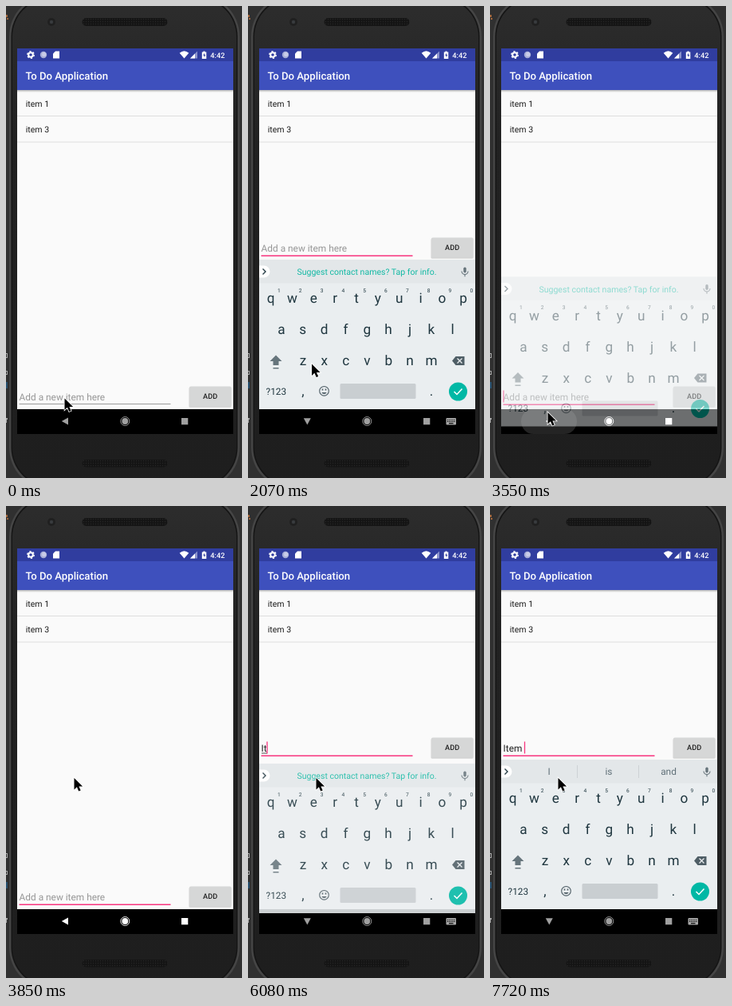
An HTML page for the animation above (8 s loop, 296x590 px).

```html
<!DOCTYPE html>
<html lang="en">
<head>
<meta charset="utf-8">
<title>To do app</title>
<style>
  html, body { margin: 0; width: 100%; height: 100%; overflow: hidden; background: #303030; }
  svg { display: block; width: 296px; height: 590px; }
  text { font-family: Roboto, sans-serif; text-rendering: geometricPrecision; white-space: pre; }
  .mid { text-anchor: middle; }
  .med { font-weight: 500; }
</style>
</head>
<body>
<svg viewBox="0 0 296 590" xmlns="http://www.w3.org/2000/svg">
  <defs>
    <linearGradient id="body" x1="0" y1="0" x2="0" y2="1">
      <stop offset="0" stop-color="#2d2d2d"/>
      <stop offset=".3" stop-color="#212121"/>
      <stop offset="1" stop-color="#1e1e1e"/>
    </linearGradient>
    <linearGradient id="shade" x1="0" y1="0" x2="0" y2="1">
      <stop offset="0" stop-color="#000" stop-opacity=".28"/>
      <stop offset="1" stop-color="#000" stop-opacity="0"/>
    </linearGradient>
    <pattern id="mesh" width="3" height="3" patternUnits="userSpaceOnUse">
      <rect width="3" height="3" fill="#141414"/>
      <circle cx="1.5" cy="1.5" r=".7" fill="#262626"/>
    </pattern>
    <clipPath id="screen"><rect x="14" y="53" width="271" height="482"/></clipPath>
  </defs>

  <!-- desktop and phone -->
  <rect width="296" height="590" fill="#303030"/>
  <path d="M0 11h2v3H0zM1 15h2v2H1z" fill="#a5673c"/>
  <path d="M0 434h2v1H0zM1 435h1v5H0v-1h1zM0 456h2v1H0zM1 457h1v4H0v-1h1zM0 515h2v2H1v4H0z" fill="#a9a9a9"/>
  <path d="M0 470h2v8H0z" fill="#28506f"/>
  <rect x="4" y="-14" width="289" height="618" rx="52" fill="#454545"/>
  <rect x="6.5" y="-11" width="284" height="612" rx="49" fill="#151515"/>
  <rect x="8" y="-9.5" width="281" height="609" rx="48" fill="url(#body)"/>
  <rect x="95.5" y="15" width="107" height="10" rx="5" fill="url(#mesh)"/>
  <rect x="95.5" y="567" width="107" height="9.5" rx="4.7" fill="url(#mesh)"/>
  <circle cx="57" cy="20" r="5" fill="#202020"/>
  <circle cx="57" cy="20" r="2.2" fill="#383b3e"/>

  <g clip-path="url(#screen)">
    <rect x="14" y="53" width="271" height="482" fill="#fafafa"/>
    <rect x="14" y="105" width="271" height="3" fill="url(#shade)"/>
    <rect x="14" y="53" width="271" height="16" fill="#303d9f"/>
    <rect x="14" y="69" width="271" height="36" fill="#3e50bd"/>

    <!-- status icons -->
    <circle cx="31" cy="61" r="2.8" fill="none" stroke="#fff" stroke-width="2"/>
    <circle cx="31" cy="61" r="4.2" fill="none" stroke="#fff" stroke-width="1.5" stroke-dasharray="2.2 2.198"/>
    <circle cx="47" cy="61" r="4.2" fill="#a9b0d8"/>
    <circle cx="47.6" cy="60.4" r="2.6" fill="#c9cde8"/>
    <path d="M62 56.5h5v9h-8v-6z" fill="#fff"/>
    <path d="M217.700 58.700q5.800-5 11.600 0l-5.800 6.900z" fill="#fff"/>
    <path d="M240 56.500v9h-9z" fill="#8b93cc"/>
    <path d="M237 59.500v6h-6z" fill="#fff"/>
    <path d="M247.500 56.500h2v1h1.800v8.500h-5.500v-8.500h1.700z" fill="#fff"/>
    <path d="M249 58.500l-1.700 3.500h1.200v2.500l1.700-3.500h-1.200z" fill="#303d9f"/>
    <text class="med" x="256.300" y="64.700" font-size="9.230" fill="#fff">4:42</text>

    <text class="med" x="24.500" y="92" font-size="13.200" fill="#fff">To Do Application</text>
    <g font-size="10.550" fill="#1c1c1c">
      <text x="24.700" y="125.600">item 1</text>
      <text x="24.700" y="158.100">item 3</text>
    </g>
    <path d="M14 137.500h271M14 170h271" stroke="#dedede"/>

    <!-- entry row -->
    <g id="row">
      <text id="entry" x="16.600" y="493" font-size="11.870"></text>
      <path id="compose" stroke="#212121" stroke-width=".8"/>
      <path id="line"/>
      <path id="caret" stroke="#f8357f" stroke-width="1.300"/>
      <rect x="229.500" y="476.500" width="53" height="25.300" rx="1.500" fill="#000" opacity=".16"/>
      <rect x="230" y="475.500" width="52.500" height="25" rx="1.500" fill="#d6d7d7"/>
      <text class="mid med" x="256.200" y="491.300" font-size="9.230" fill="#212121">ADD</text>
    </g>

    <rect x="14" y="504" width="271" height="31" fill="#000"/>

    <!-- soft keyboard -->
    <g id="board">
      <rect x="14" y="317" width="271" height="187" fill="#eaeef0"/>
      <rect x="14" y="317" width="271" height="29.500" fill="#e3e7e9"/>
      <path d="M14 324.500h6a7.500 7.500 0 0 1 0 15h-6z" fill="#fff"/>
      <path d="M18.500 328.500l3.500 3.500-3.500 3.500" fill="none" stroke="#263c45" stroke-width="1.400"/>
      <text id="tip" class="mid" x="149" y="336" font-size="10.550" fill="#12b9a4">Suggest contact names? Tap for info.</text>
      <g id="words" class="mid" font-size="11.870" fill="#607078">
        <path d="M109.500 324v16M186.500 324v16" stroke="#cdd2d5"/>
        <text x="74" y="336.300"></text><text x="149" y="336.300"></text><text x="224" y="336.300"></text>
      </g>
      <g stroke="#66747b" fill="none" stroke-width="1.100">
        <rect x="270.300" y="326.500" width="3.400" height="7" rx="1.700" fill="#66747b" stroke="none"/>
        <path d="M268 331.500a4 4 0 0 0 8 0M272 335.500v2.700"/>
      </g>
      <g id="keys" class="mid" fill="#1f363f"></g>
      <path d="M35 436.500l7.500 7.500h-4v5h-7v-5h-4zM31.500 452h7v1.600h-7z" fill="#66757c"/>
      <path d="M260.500 438h11v11h-11l-4.500-5.500z" fill="#4f5e66"/>
      <path d="M262.500 440.500l6 6m0-6l-6 6" stroke="#eaeef0" stroke-width="1.300"/>
      <g fill="none" stroke="#4f5e66" stroke-width="1.100">
        <circle cx="95.500" cy="481.300" r="5.800"/>
        <path d="M92.300 483a3.400 3 0 0 0 6.400 0z" fill="#4f5e66" stroke="none"/>
        <path d="M93.500 478.500v2M97.500 478.500v2" stroke-width="1.600"/>
      </g>
      <rect x="115.500" y="472" width="95" height="19" rx="1.500" fill="#c9ced1"/>
      <circle cx="263.500" cy="482" r="11.500" fill="#00b8a5"/>
      <path d="M258.500 482l3.500 3.500 6.500-7" fill="none" stroke="#fff" stroke-width="1.500"/>
    </g>

    <!-- navigation bar -->
    <rect id="ripple" y="503.500" height="31.500" rx="15.700" fill="#b4b4b4"/>
    <g id="nav">
      <path id="back"/>
      <circle cx="149.300" cy="519" r="3.900"/>
      <circle cx="149.300" cy="519" r="5.500" fill="none" id="ring"/>
      <rect x="220" y="515" width="8.300" height="8.300"/>
    </g>
    <g id="switch">
      <rect x="248.500" y="515" width="12.500" height="8.500" rx="1" fill="#a8a8a8"/>
      <path d="M250 517.200h9.500M250 519.400h9.500" stroke="#000" stroke-width="1.100" stroke-dasharray="1.100 1"/>
      <path d="M252 521.700h5.500" stroke="#000" stroke-width="1.100"/>
    </g>
  </g>

  <path id="mouse" d="M0 0v14.500l3.400-3.200 2.300 5.200 2.500-1.100-2.300-5h4.700z" fill="#000" stroke="#fff" stroke-width="1.600" paint-order="stroke"/>
</svg>

<script>
const LOOP = 8000, GAP = 40;
const $ = id => document.getElementById(id);
const set = (node, attrs) => {
  for (const k in attrs) node.setAttribute(k, attrs[k]);
};
const show = (node, on) => set(node, { display: on ? 'inline' : 'none' });

// key caps
const caps = [];
const cap = (s, x, y, size) =>
  caps.push(`<text x="${x.toFixed(1)}" y="${y}" font-size="${size}">${s}</text>`);
[['qwertyuiop', 28.7, 371], ['asdfghjkl', 42, 410], ['zxcvbnm', 69, 449]].forEach(([row, x, y], r) => {
  [...row].forEach((ch, i) => {
    cap(ch, x + i * 26.83, y, 17.2);
    if (!r) cap((i + 1) % 10, x + 10.1 + i * 26.83, 357.6, 6.6);
  });
});
cap('?123', 35.3, 485.7, 11.8);
cap(',', 69, 486.5, 17);
cap('.', 230, 486.5, 17);
$('keys').innerHTML = caps.join('');

/* m: pointer, focus, caret, up: entry row raised, drop: keyboard offset
   (GAP = hidden), ime: keyboard navigation, lit: bright icons, ripple: press
   strength, text: entry with cx as caret place, words: suggestions */
const start = {
  m: [73.5, 490.5], focus: 0, caret: 0, up: 0, drop: GAP, ime: 0,
  lit: 0, ripple: 0, text: '', cx: 17, words: null
};
const guesses = ['items', 'Item', 'Itemized'];
const steps = [
  [140, { m: [72.5, 489.5] }],
  [880, { m: [74, 487] }],
  [1030, { m: [75, 485.5], focus: 1, caret: 1 }],
  [1170, { ime: 1 }],
  [1470, { up: 1, drop: 21 }],
  [1620, { drop: 5 }],
  [1770, { drop: 0, m: [77, 474] }],
  [2070, { m: [80, 447.5], caret: 0 }],
  [2220, { m: [88, 462] }],
  [2370, { m: [104, 503] }],
  [2510, { m: [118, 538], caret: 1 }],
  [2660, { m: [121, 545] }],
  [2800, { m: [105, 541] }],
  [2950, { m: [86, 531] }],
  [3100, { m: [75, 524], caret: 0 }],
  [3250, { m: [73, 514], ripple: .5 }],
  [3400, { m: [72.5, 508], ripple: .8, caret: 1, up: 0, drop: 6, ime: 0, lit: 1 }],
  [3550, { drop: 21.5, ripple: 1 }],
  [3700, { m: [79, 420], drop: GAP, ripple: .4 }],
  [3850, { m: [85.5, 340], ripple: 0, caret: 0 }],
  [4300, { caret: 1 }],
  [4750, { caret: 0 }],
  [5350, { caret: 1 }],
  [5640, { text: 'I', cx: 20 }],
  [5790, { ime: 1, lit: 0 }],
  [5930, { text: 'It', cx: 24, up: 1, drop: 22.5 }],
  [6080, { drop: 5 }],
  [6230, { text: 'Ite', cx: 30.2, drop: 0, words: guesses }],
  [6380, { text: 'Item', cx: 40.5 }],
  [6830, { caret: 0 }],
  [7430, { caret: 1 }],
  [7720, { text: 'Item ', cx: 43.5, words: ['I', 'is', 'and'] }]
];

const wordNodes = [...$('words').querySelectorAll('text')];

function draw(t) {
  const s = { ...start };
  for (const [at, change] of steps) if (at <= t) Object.assign(s, change);

  set($('mouse'), { transform: `translate(${s.m})` });

  set($('row'), { transform: `translate(0 ${s.up ? -186 : 0})` });
  $('entry').textContent = s.text || 'Add a new item here';
  set($('entry'), { fill: s.text ? '#212121' : '#969696' });
  const composing = s.text && !s.text.endsWith(' ');
  set($('compose'), { d: composing ? `M17 495H${s.cx}` : '' });
  set($('line'), s.focus
    ? { d: 'M16.500 498.200H206.500', stroke: '#f8357f', 'stroke-width': 1.4 }
    : { d: 'M16.500 497.500H206.500', stroke: '#8f8f8f', 'stroke-width': .9 });
  set($('caret'), { d: `M${s.cx} 480.500V495.500` });
  show($('caret'), s.caret);

  set($('board'), { transform: `translate(0 ${s.drop})`, opacity: 1 - s.drop / GAP });
  show($('board'), s.drop < GAP);
  show($('tip'), !s.words);
  show($('words'), s.words);
  if (s.words) wordNodes.forEach((n, i) => { n.textContent = s.words[i]; });

  const tone = s.lit ? '#fff' : '#a0a0a0';
  set($('nav'), { fill: tone });
  set($('ring'), { stroke: tone, 'stroke-width': .9 });
  set($('back'), { d: s.ime ? 'M69.800 515.300h9l-4.500 8.200z' : 'M69.800 519l8.200-4.500v9z' });
  show($('switch'), s.ime);

  const half = 16 + 19 * s.ripple;
  set($('ripple'), { x: 74 - half, width: 2 * half, opacity: .2 * Math.min(1, s.ripple * 1.5) });
  show($('ripple'), s.ripple);
}

const begin = performance.now();
function tick() {
  draw((performance.now() - begin) % LOOP);
  requestAnimationFrame(tick);
}
tick();
</script>
</body>
</html>
```
